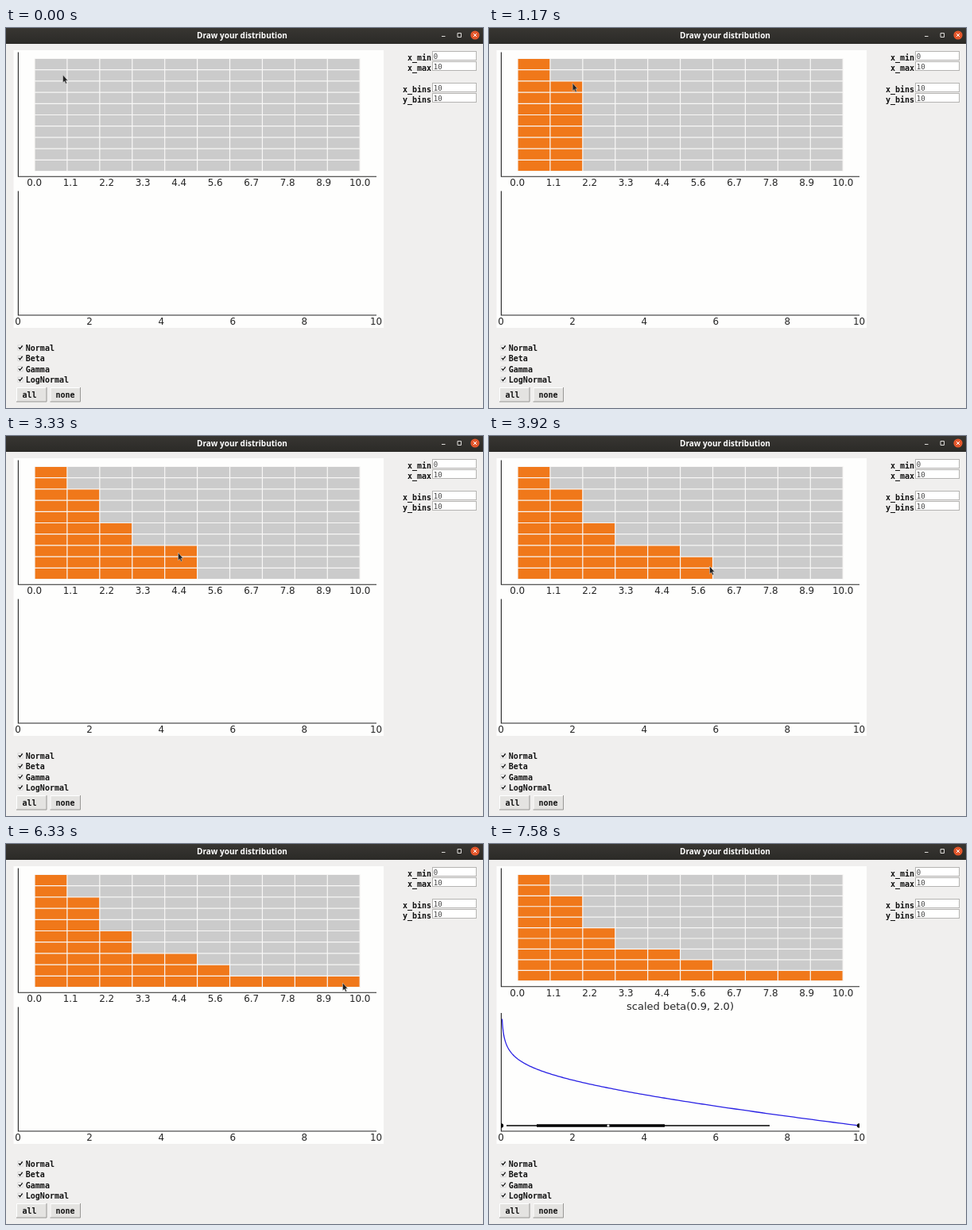
These frames come from a looping animation (600 px wide and 479 px high, 8000 ms). An HTML page:

```html
<!DOCTYPE html>
<html lang="en">
<head>
<meta charset="utf-8">
<title>Draw your distribution</title>
<style>
  html, body { margin: 0; width: 100%; height: 100%; overflow: hidden; background: #f0efee; }
  svg { display: block; width: 600px; height: 479px; }
  .head { font: bold 10px "Noto Sans", sans-serif; fill: #fff; text-anchor: middle; }
  .tick { font: 11.9px "DejaVu Sans", sans-serif; fill: #262626; text-anchor: middle; }
  .fit { font-size: 13px; }
  .ui { font: bold 10px "DejaVu Sans Mono", monospace; fill: #111; }
  .val { font: 9px "DejaVu Sans Mono", monospace; fill: #444; }
  .axis { fill: none; stroke: #262626; stroke-width: 1.1; }
  .grid { fill: none; stroke: #f8f7f6; stroke-width: 1.2; }
</style>
</head>
<body>
<svg viewBox="0 0 600 479">
  <defs>
    <linearGradient id="bar" x2="0" y2="1">
      <stop stop-color="#383632"/><stop offset="1" stop-color="#2b2a27"/>
    </linearGradient>
    <clipPath id="inside"><rect x="15" y="206" width="451" height="156"/></clipPath>
  </defs>
  <rect width="600" height="479" fill="#f0efee"/>
  <rect width="600" height="20" fill="url(#bar)"/>
  <text class="head" x="297" y="13">Draw your distribution</text>
  <path d="M548 10.5h4.5M568 6.5h4.5v5h-4.5z" fill="none" stroke="#deddda"/>
  <circle cx="590" cy="9" r="5.6" fill="#e4572c"/>
  <path d="M588 7l4 4m0-4l-4 4" stroke="#fff"/>
  <rect x="9.5" y="28" width="465.5" height="350" fill="#fefefd"/>
  <g id="plot"></g>
  <g id="panel"></g>
  <path id="cursor" d="M.5 0V9.8L2.6 7.9L4.1 11.2L5.6 10.5L4.2 7.2H6.8Z" fill="#222" stroke="#ddd" stroke-width=".5"/>
</svg>
<script>
const LOOP = 8000, STEPS = 96, FIT = 90, EXIT = 85;
const LEFT = 36, TOP = 38.5, BINS = 10, CELL = 40.92, ROW = 14.2, FIT_ROW = 13.42;
const RIGHT = LEFT + BINS * CELL;
const $ = id => document.getElementById(id);
const plot = $("plot"), panel = $("panel"), cursor = $("cursor");

function set(el, attrs) {
  for (const name in attrs) el.setAttribute(name, attrs[name]);
}
function add(parent, tag, attrs, text = "") {
  const el = document.createElementNS("http://www.w3.org/2000/svg", tag);
  set(el, attrs);
  el.textContent = text;
  return parent.appendChild(el);
}
const show = (el, on) => { el.style.display = on ? "" : "none"; };

// Pointer stops: x, y, arrival step, click step (none when only passing)
const stops = [
  [71, 59, 0], [57, 45, 4, 6], [103, 67, 10, 12], [133, 112, 20, 22],
  [176, 141, 29, 32], [216, 147, 36, 40], [277, 164, 46, 46], [327, 164, 54],
  [305, 167, 60, 62], [334, 167, 64, 66], [372, 173, 70, 72], [423, 175, 74, 76],
  [226, 233, 81], [54, 193, 84]
].map(([x, y, arrive, click]) => ({ x, y, arrive, click, leave: click ? click + 1 : arrive }));

const back = add(plot, "rect", { x: LEFT, y: TOP, width: RIGHT - LEFT, fill: "#cbcbcb" });

// Each click fills its column up to the cell under the pointer
const bars = stops.filter(s => s.click).map(({ x, y, click }) => {
  const col = Math.floor((x - LEFT) / CELL);
  const rows = Math.ceil(BINS - (y - TOP) / ROW);
  const el = add(plot, "rect", { x: LEFT + col * CELL, width: CELL, fill: "#f0781a" });
  return { el, rows, click };
});

const grid = add(plot, "path", { class: "grid" });
const axes = add(plot, "path", { class: "axis" });
const topTicks = [];
for (let i = 0; i < BINS; i++)
  topTicks.push(add(plot, "text", { class: "tick", x: 35.7 + i * 45.5 }, (i * 10 / 9).toFixed(1)));
for (let v = 0; v <= 10; v += 2)
  add(plot, "text", { class: "tick", x: 15 + v * 45.05, y: 374.3 }, v);

// Fitted beta density with its interval summary
const fit = add(plot, "g", {});
add(fit, "text", { class: "tick fit", x: 240.5, y: 208.5 }, "scaled beta(0.9, 2.0)");
const points = Array.from({ length: 200 }, (_, i) => {
  const u = 0.0022 + 0.9978 * (i / 199) ** 3;
  const density = u ** -0.14 * (1 - u);
  return (15.5 + 450 * u).toFixed(2) + "," + (355 - 57.2 * density).toFixed(2);
});
add(fit, "polyline", { points: points.join(" "), fill: "none", stroke: "#2a22e4", "stroke-width": 1.3 });
add(fit, "path", { d: "M22 355H353", stroke: "#000", "stroke-width": 1.7 });
add(fit, "path", { d: "M60 355H221", stroke: "#000", "stroke-width": 3.4 });
add(fit, "circle", { cx: 150, cy: 355, r: 1.6, fill: "#fff" });
for (const cx of [15.5, 465.5])
  add(fit, "circle", { cx, cy: 355, r: 2.7, "clip-path": "url(#inside)" });

// Form controls
[["x_min", 0, 30], ["x_max", 10, 43], ["x_bins", 10, 70], ["y_bins", 10, 83]].forEach(([name, value, y]) => {
  add(panel, "text", { class: "ui", x: 535, y: y + 10.6, "text-anchor": "end" }, name);
  add(panel, "rect", { x: 536.5, y: y - .5, width: 55, height: 11, fill: "#fff", stroke: "#b5b4b2" });
  add(panel, "text", { class: "val", x: 537.8, y: y + 8.6 }, value);
});
["Normal", "Beta", "Gamma", "LogNormal"].forEach((name, i) => {
  const y = 403 + i * 13.4;
  add(panel, "rect", { x: 15, y: y - 3, width: 6, height: 6, fill: "#fff", stroke: "#ccc", "stroke-width": .8 });
  add(panel, "path", { d: `M16 ${y - .5}l1.6 2l3-4`, fill: "none", stroke: "#111", "stroke-width": 1.3 });
  add(panel, "text", { class: "ui", x: 24.8, y: y + 4 }, name);
});
[["all", 13, 20.5], ["none", 55.5, 62.5]].forEach(([name, x, textX]) => {
  add(panel, "rect", { x, y: 453, width: 38.5, height: 18.5, fill: "#e4e3e1" });
  add(panel, "path", { d: `M${x + .5} 471V453.5h38`, fill: "none", stroke: "#fff" });
  add(panel, "path", { d: `M${x} 471h38V453`, fill: "none", stroke: "#989795" });
  add(panel, "text", { class: "ui", x: textX, y: 466.3 }, name);
});

// The upper plot shrinks to make room for the fit title
function layout(fitted) {
  const row = fitted ? FIT_ROW : ROW, bottom = TOP + BINS * row;
  let lines = "";
  for (let i = 0; i <= BINS; i++)
    lines += `M${LEFT + i * CELL} ${TOP}V${bottom}M${LEFT} ${TOP + i * row}H${RIGHT}`;
  set(grid, { d: lines });
  set(back, { height: bottom - TOP });
  for (const { el, rows } of bars) set(el, { y: bottom - rows * row, height: rows * row });
  set(axes, { d: `M15.4 30.5V${fitted ? 179.7 : 187.3}H466M15.4 ${fitted ? 213 : 205.5}V362H466` });
  for (const label of topTicks) set(label, { y: fitted ? 191.5 : 199.3 });
  show(fit, fitted);
}

function pointerAt(step) {
  const next = stops.findIndex(s => s.arrive > step);
  if (next < 0) return stops[stops.length - 1];
  const a = stops[next - 1], b = stops[next];
  const p = Math.max(0, (step - a.leave) / (b.arrive - a.leave));
  const e = p * p * (3 - 2 * p);
  return { x: a.x + (b.x - a.x) * e, y: a.y + (b.y - a.y) * e };
}

function draw(step) {
  layout(step >= FIT);
  for (const { el, click } of bars) show(el, step >= click);
  const { x, y } = pointerAt(step);
  set(cursor, { transform: `translate(${x} ${y})` });
  show(cursor, step < EXIT);
}

// The screen refreshes twelve times a second
const start = performance.now();
let last = -1;
function tick() {
  const t = (performance.now() - start) % LOOP;
  const step = Math.floor((t + 4) * STEPS / LOOP) % STEPS;
  if (step !== last) draw(last = step);
  requestAnimationFrame(tick);
}
tick();
</script>
</body>
</html>
```
